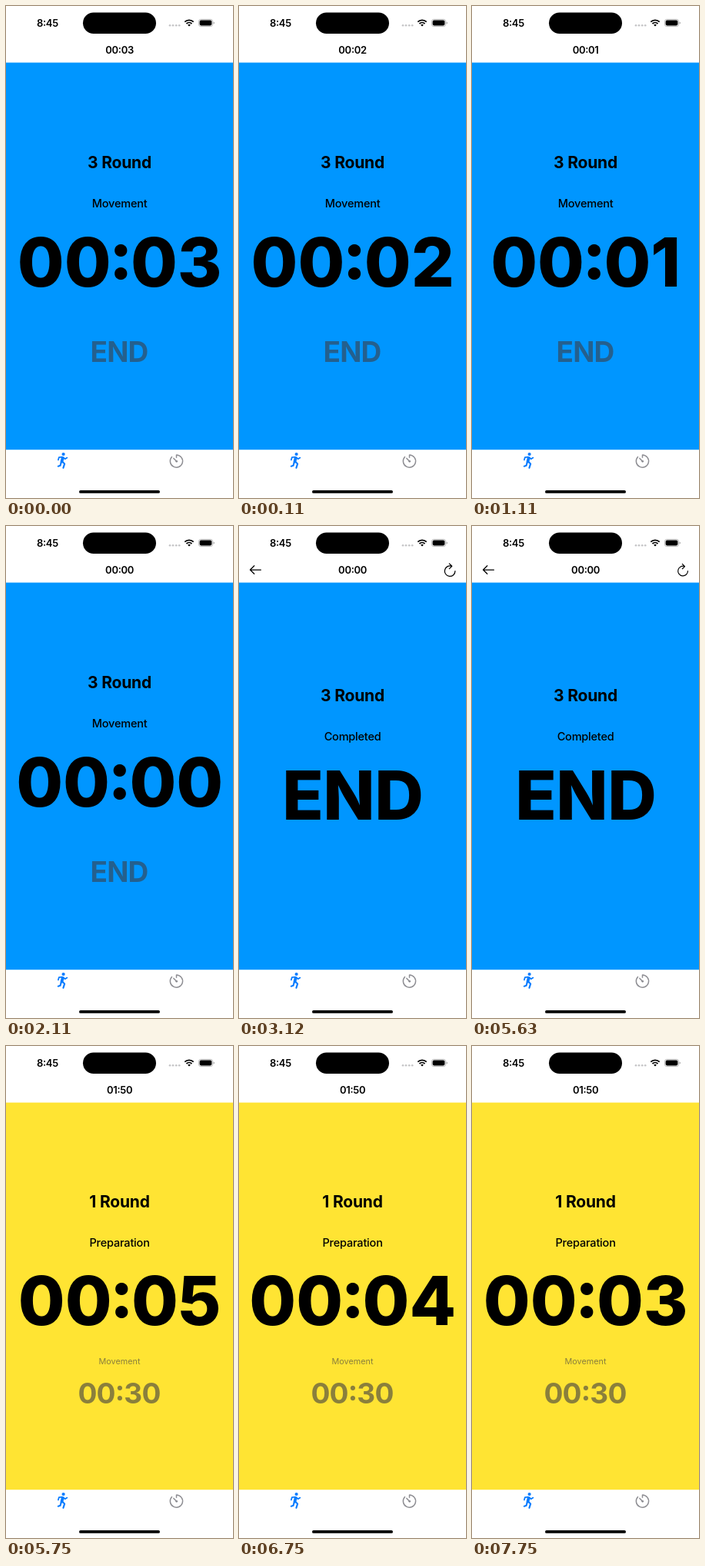
Animation of 295x640 px, one loop 8000 ms. Source, as an HTML page:

```html
<!DOCTYPE html>
<html lang="en">
<head>
<meta charset="utf-8">
<title>Interval timer</title>
<style>
  html, body { margin: 0; width: 100%; height: 100%; overflow: hidden; background: #fff; }
  svg { display: block; width: 100vw; height: 100vh; }
  /* "case" lifts the colon to the middle of the digits */
  text { font-family: Inter, Roboto, sans-serif; font-optical-sizing: none; font-feature-settings: "case"; text-anchor: middle; }
  .bar { font-size: 13px; font-weight: 600; letter-spacing: -.3px; }
  .round { font-size: 21px; font-weight: 700; letter-spacing: -.2px; }
  .phase { font-size: 14.5px; font-weight: 500; letter-spacing: -.2px; }
  .clock { font-size: 88px; font-weight: 800; }
  .clock.word { letter-spacing: -.5px; }
  .next { font-size: 37px; font-weight: 700; letter-spacing: -.8px; }
  .hint { font-size: 10.8px; }
  .next, .hint { fill: rgba(60, 60, 67, .6); }
  .line { fill: none; stroke: #000; stroke-linecap: round; stroke-linejoin: round; }
</style>
</head>
<body>
<svg viewBox="0 0 295 640">
  <rect width="295" height="640" fill="#fff"/>
  <rect id="panel" y="73.6" width="295" height="503.6"/>

  <!-- status bar -->
  <text class="bar" x="53.9" y="26.7">8:45</text>
  <rect x="100" y="8.5" width="95" height="27.5" rx="13.75"/>
  <g fill="#c4c4c6">
    <circle cx="213" cy="25.2" r="1.3"/><circle cx="217" cy="25.2" r="1.3"/>
    <circle cx="221.2" cy="25.2" r="1.3"/><circle cx="225.2" cy="25.2" r="1.3"/>
  </g>
  <g class="line" stroke-width="1.8" style="stroke-linecap:butt">
    <path d="M232.3 20.7a8.2 8.2 0 0 1 11.4 0"/>
    <path d="M234.5 23a5 5 0 0 1 7 0"/>
  </g>
  <path d="M236.2 24.7a2.6 2.6 0 0 1 3.6 0L238 26.6z"/>
  <rect x="250.4" y="17.4" width="18.2" height="9.2" rx="2.9" fill="none" stroke="#a6a6a6" stroke-width=".8"/>
  <rect x="251.6" y="18.6" width="15.8" height="6.8" rx="1.8"/>
  <path d="M269.6 20.5q1.4.4 1.4 1.5t-1.4 1.5z" fill="#a6a6a6"/>

  <!-- navigation -->
  <text id="total" class="bar" x="147.6" y="61.7"></text>
  <g id="nav" class="line" stroke-width="1.25">
    <path d="M28.4 57H14.6M19.8 51.7L14.5 57l5.3 5.3"/>
    <g id="redo"><path d="M276.4 52.2A6.8 6.8 0 1 0 280.9 58.6M273.3 48.9l3.4 3.4-3.4 3.3"/></g>
  </g>

  <!-- content -->
  <text id="round" class="round" x="147.5"></text>
  <text id="phase" class="phase" x="147.6"></text>
  <text id="clock" class="clock" x="147.7"><tspan id="lead"></tspan><tspan id="colon" dx="-2.8"></tspan><tspan id="secs" dx="-2.8"></tspan></text>
  <text id="hint" class="hint" x="147.5" y="414"></text>
  <text id="next" class="next" x="147"></text>

  <!-- tab bar -->
  <circle cx="74.6" cy="583" r="2.1" fill="#087cff"/>
  <g class="line" style="stroke:#087cff">
    <path stroke-width="3.8" d="M73.6 588L72.5 592.6"/>
    <path stroke-width="1.8" d="M74.4 587.2l2.4 2 2.6-1.6M72.8 586.7l-4 .5-.9 3.2"/>
    <path stroke-width="2.1" d="M73.2 592.8l2.9 2.8-1.7 5.2M71.7 593.6l-1.1 4.2-2.8.9"/>
  </g>
  <g class="line" style="stroke:#8e8e93" stroke-width="1.5">
    <path d="M221.5 587.3V584A8.1 8.1 0 1 1 215.5 586.6M217.9 588.4L221.6 592.2"/>
  </g>
  <circle cx="221.7" cy="592.3" r="1.4" fill="#8e8e93"/>
  <rect x="95" y="630" width="105" height="3.8" rx="1.9"/>
</svg>
<script>
const LOOP = 8000, BLUE = '#0096ff', YELLOW = '#ffe433';
const el = id => document.getElementById(id);
const mmss = s => '00:' + String(s).padStart(2, '0');

function put(id, text, y) {
  const node = el(id);
  if (node.textContent !== text) node.textContent = text;
  if (y) node.setAttribute('y', y);
}

function putClock(text, y) {
  const [lead, secs = ''] = text.split(':');
  put('lead', lead);
  put('colon', secs && ':');
  put('secs', secs);
  el('clock').setAttribute('y', y);
  el('clock').classList.toggle('word', !secs);
}

// Counts down once per second, the first tick falling at `start`.
const countdown = (t, from, start) => from - Math.max(0, Math.floor((t - start) / 1000) + 1);

function moving(t) {
  const left = mmss(countdown(t, 3, 110));
  return { color: BLUE, total: left, round: ['3 Round', 211], phase: ['Movement', 262],
           clock: [left, 364.5], hint: '', next: ['END', 463.3] };
}

const completed = () => ({
  color: BLUE, total: '00:00', round: ['3 Round', 228.2], phase: ['Completed', 279.2],
  clock: ['END', 382], hint: '', next: [''], done: true
});

const preparing = t => ({
  color: YELLOW, total: '01:50', round: ['1 Round', 209.5], phase: ['Preparation', 260.5],
  clock: [mmss(countdown(t, 5, 6750)), 363], hint: 'Movement', next: ['00:30', 464.8]
});

function draw(t) {
  const s = t < 3120 ? moving(t) : t < 5750 ? completed() : preparing(t);
  el('panel').setAttribute('fill', s.color);
  put('total', s.total);
  put('round', ...s.round);
  put('phase', ...s.phase);
  putClock(...s.clock);
  put('hint', s.hint);
  put('next', ...s.next);
  el('nav').style.display = s.done ? '' : 'none';
  const press = t >= 5630 ? .94 : 1;
  el('redo').setAttribute('transform', `translate(274 57.5) scale(${press}) translate(-274 -57.5)`);
}

const begin = performance.now();
function tick() {
  draw((performance.now() - begin) % LOOP);
  requestAnimationFrame(tick);
}
tick();
</script>
</body>
</html>
```
